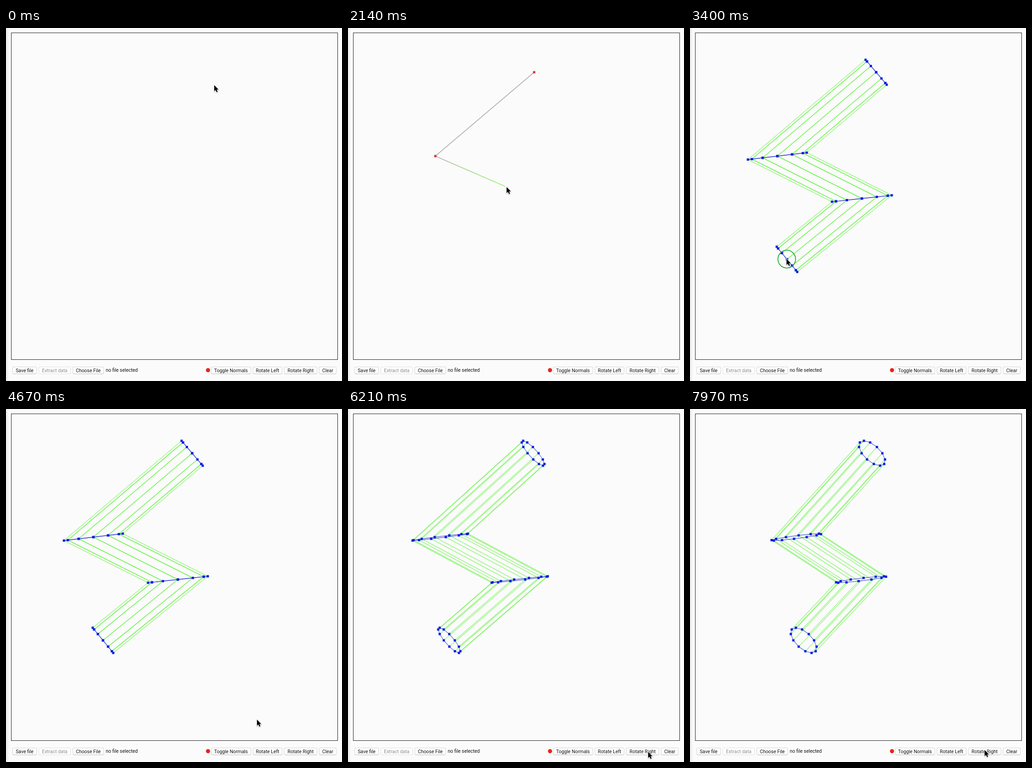
Write an HTML page with a canvas that moves like this. It is 731 by 766 pixels and loops after 8 s.

```html
<!DOCTYPE html>
<html lang="en">
<head>
<meta charset="utf-8">
<title>Pipe sketch</title>
<style>
  html, body { margin: 0; width: 100%; height: 100%; overflow: hidden; }
  body {
    position: relative;
    background: linear-gradient(90deg, #ebebeb, #fbfbfb 7px);
    font: 10.4px Roboto, sans-serif;
    color: #111;
  }
  canvas { position: absolute; left: 0; top: 0; }
  .frame {
    position: absolute; left: 11px; top: 10px; width: 709px; height: 708px;
    border: 1px solid #222;
  }
  .button, .label { position: absolute; top: 735px; height: 15px; line-height: 16px; white-space: nowrap; }
  .button {
    box-sizing: border-box; height: 16px; line-height: 15px; text-align: center;
    background: #fff; border: 1px solid #d6d6d6; border-bottom-color: #bcbcbc; border-radius: 3px;
  }
  .disabled { color: #8c8c8c; border-color: #e0e0e0; }
  .pressed { color: #fff; background: linear-gradient(#707070, #484848); border-color: #555; }
  .dot { position: absolute; left: 435px; top: 737.5px; width: 9.4px; height: 9.4px; border-radius: 50%; background: #e8241c; }
</style>
</head>
<body>
<div class="frame"></div>
<div class="button" style="left:14px;width:53px">Save file</div>
<div class="button disabled" style="left:71px;width:70px">Extract data</div>
<div class="button" style="left:145px;width:68px">Choose File</div>
<div class="label" style="left:217px">no file selected</div>
<div class="dot"></div>
<div class="button" style="left:446px;width:87px">Toggle Normals</div>
<div class="button" style="left:537px;width:64px">Rotate Left</div>
<div class="button" id="rotateRight" style="left:605px;width:72px">Rotate Right</div>
<div class="button" style="left:681px;width:38px">Clear</div>
<canvas id="stage" width="731" height="766"></canvas>
<script>
const LOOP = 8000;
const ctx = document.getElementById('stage').getContext('2d');
const rotateRight = document.getElementById('rotateRight');

// Spine points, when each is placed, and the in-plane half axis of its ring.
const joints = [
  { x: 405, y: 96, at: 880, dx: 23, dy: 27 },
  { x: 190, y: 278, at: 1600, dx: 64, dy: -7.5 },
  { x: 374, y: 370, at: 2340, dx: 65, dy: -7 },
  { x: 211, y: 502, at: 2900, dx: 22.3, dy: 27.3 }
];
const PIPE_AT = 3130, RADIUS = 35, SIDES = 12, AXIS_X = 366.5;
const HALO_FROM = 2900, HALO_TO = 3740;

const releases = [5320, 5580, 5830, 6080, 6330, 6580, 6790, 7050];
const PRESS_TIME = 90, STEP = 5 * Math.PI / 180;

const smooth = u => u * u * (3 - 2 * u);
const accelerate = u => u * u;
const decelerate = u => u * (2 - u);

// Pointer stops: time, x, y, easing towards the stop.
const path = [
  [0, 453, 124, smooth], [570, 453, 124, smooth],
  [850, 405, 96, smooth], [930, 405, 96, smooth],
  [1540, 190, 278, smooth], [1650, 190, 278, smooth],
  [2140, 345, 345, accelerate], [2250, 374, 370, decelerate], [2380, 374, 370, smooth],
  [2850, 210, 501, smooth], [3690, 210, 501, smooth],
  [4670, 546, 674, accelerate], [4990, 653, 744, decelerate],
  [7300, 653, 744, smooth], [7650, 641, 740, smooth], [LOOP, 641, 740, smooth]
];

function pointer(t) {
  const i = Math.max(1, path.findIndex(stop => stop[0] >= t));
  const [t0, x0, y0] = path[i - 1], [t1, x1, y1, ease] = path[i];
  const k = ease(Math.max(0, (t - t0) / (t1 - t0)));
  return { x: x0 + (x1 - x0) * k, y: y0 + (y1 - y0) * k };
}

function line(a, b, color, width = 1.5) {
  ctx.strokeStyle = color;
  ctx.lineWidth = width;
  ctx.beginPath();
  ctx.moveTo(a.x, a.y);
  ctx.lineTo(b.x, b.y);
  ctx.stroke();
}

function square(p, color) {
  ctx.fillStyle = color;
  ctx.fillRect(p.x - 2.5, p.y - 2.5, 5, 5);
}

function drawSpine(t) {
  const placed = joints.filter(j => t >= j.at);
  if (!placed.length) return;
  placed.slice(1).forEach((p, i) => line(placed[i], p, '#b5b5b5', 1.7));
  if (placed.length < joints.length) {
    const from = placed[placed.length - 1], to = pointer(t - 5);
    const fade = ctx.createLinearGradient(from.x, from.y, to.x, to.y);
    fade.addColorStop(0, '#b0b4ae');
    fade.addColorStop(1, '#9cfb72');
    line(from, to, fade, 1.7);
  }
  placed.forEach(p => square(p, '#d8372b'));
}

function ringPoints(joint, angle) {
  return Array.from({ length: SIDES }, (_, i) => {
    const phi = i * 2 * Math.PI / SIDES;
    const x = joint.x + joint.dx * Math.cos(phi) - AXIS_X;
    const z = RADIUS * Math.sin(phi);
    return {
      x: AXIS_X + x * Math.cos(angle) + z * Math.sin(angle),
      y: joint.y + joint.dy * Math.cos(phi)
    };
  });
}

function drawPipe(angle) {
  const rings = joints.map(j => ringPoints(j, angle));
  rings.slice(1).forEach((ring, r) =>
    ring.forEach((p, i) => line(rings[r][i], p, 'rgba(75,240,35,.53)')));
  rings.forEach(ring => {
    ring.forEach((p, i) => line(p, ring[(i + 1) % SIDES], 'rgba(35,55,200,.7)', 1.3));
    ring.forEach(p => square(p, '#0b20e4'));
  });
}

function drawHalo() {
  ctx.strokeStyle = '#0ea51c';
  ctx.lineWidth = 1.6;
  ctx.beginPath();
  ctx.arc(210.5, 501.5, 19.2, 0, 2 * Math.PI);
  ctx.stroke();
}

const arrow = new Path2D('M0 0V13.2L3 10.4L5.2 15.2L7.5 14.2L5.4 9.5H9.4Z');
function drawPointer({ x, y }) {
  ctx.save();
  ctx.translate(x, y);
  ctx.shadowColor = 'rgba(0,0,0,.3)';
  ctx.shadowBlur = 2;
  ctx.shadowOffsetY = 1;
  ctx.strokeStyle = '#fff';
  ctx.lineWidth = 1.6;
  ctx.stroke(arrow);
  ctx.shadowColor = 'transparent';
  ctx.fillStyle = '#000';
  ctx.fill(arrow);
  ctx.restore();
}

function draw(now) {
  const t = now % LOOP;
  ctx.clearRect(0, 0, 731, 766);
  if (t < PIPE_AT) drawSpine(t);
  else drawPipe(STEP * releases.filter(r => t >= r).length);
  if (t >= HALO_FROM && t < HALO_TO) drawHalo();
  rotateRight.classList.toggle('pressed', releases.some(r => t >= r - PRESS_TIME && t < r));
  drawPointer(pointer(t));
  requestAnimationFrame(tick);
}

let start;
function tick(now) {
  start ??= now;
  draw(now - start);
}
requestAnimationFrame(tick);
</script>
</body>
</html>
```
